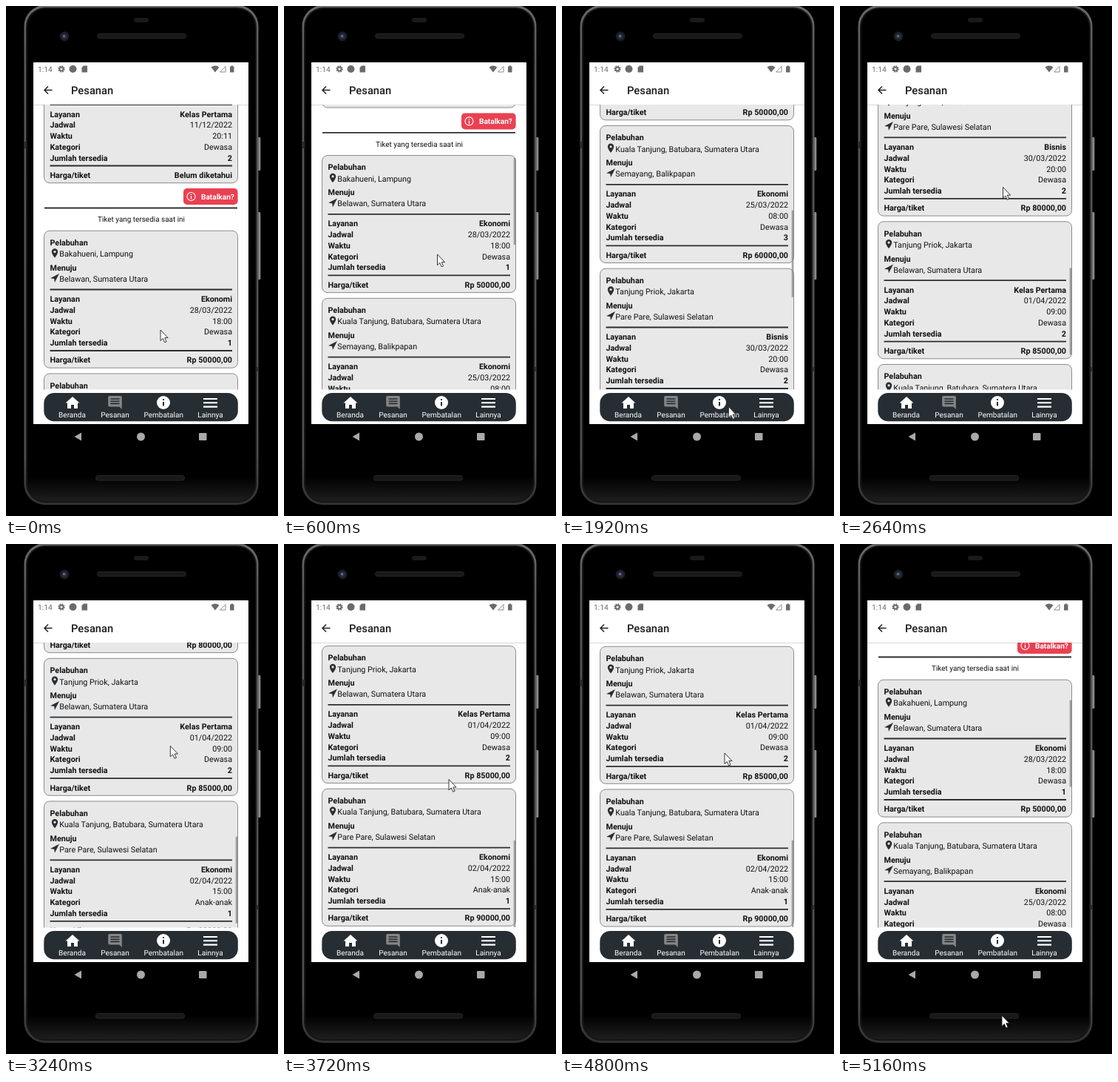
Recreate the animation shown at these times as an HTML page. Size 368 by 688 pixels, loop 5280 ms.

```html
<!DOCTYPE html>
<html lang="id">
<head>
<meta charset="utf-8">
<style>
html, body { margin: 0; width: 100%; height: 100%; overflow: hidden; background: #000; }
svg { display: block; width: 368px; height: 688px; font-family: Roboto, sans-serif; text-rendering: geometricPrecision; }
</style>
</head>
<body>
<svg viewBox="0 0 368 688">
  <defs>
    <clipPath id="view"><rect x="37" y="133" width="291" height="384.5"/></clipPath>
    <linearGradient id="rim" x1="0" x2="0" y1="0" y2="1">
      <stop offset="0" stop-color="#6a6a6a"/><stop offset=".1" stop-color="#585858"/>
      <stop offset=".9" stop-color="#505050"/><stop offset="1" stop-color="#303030"/>
    </linearGradient>
    <linearGradient id="glass" x1="0" x2="0" y1="0" y2="1">
      <stop offset="0" stop-color="#000"/><stop offset=".95" stop-color="#000"/><stop offset="1" stop-color="#1e1e1e"/>
    </linearGradient>
    <linearGradient id="key" x1="0" x2="1" y1="0" y2="0">
      <stop offset="0" stop-color="#444"/><stop offset=".6" stop-color="#9a9a9a"/><stop offset="1" stop-color="#666"/>
    </linearGradient>
    <path id="pin" d="M0-6.2a4.2 4.2 0 0 0-4.2 4.2C-4.2 1 0 6.2 0 6.2S4.2 1 4.2-2A4.2 4.2 0 0 0 0-6.2Z"/>
    <path id="plane" d="M6-6-6 .2-.8.9-.1 6Z"/>
  </defs>

  <!-- phone body -->
  <g fill="url(#key)">
    <rect x="340" y="177" width="4.500" height="45" rx="1.5"/>
    <rect x="340" y="278" width="4.500" height="91" rx="1.5"/>
  </g>
  <rect x="24.500" y="-1" width="317" height="674" rx="28" fill="url(#rim)"/>
  <rect x="27" y="2" width="312" height="668" rx="26" fill="#151515"/>
  <rect x="29" y="4" width="308" height="664" rx="24" fill="url(#glass)"/>
  <path d="M24.500 183h3v9h-3ZM338.500 487h3v6h-3Z" fill="#2c2c2c"/>
  <g fill="#181818" stroke="#262626">
    <rect x="123.500" y="37.500" width="120" height="6" rx="3"/>
    <rect x="121.500" y="633.500" width="120" height="6.500" rx="3"/>
  </g>
  <rect x="173" y="16" width="20" height="6" rx="3" fill="#1a1a1a"/>
  <circle cx="79" cy="41" r="6.500" fill="#1b1d24"/>
  <circle cx="79" cy="41" r="3.500" fill="#2a3046"/>
  <circle cx="78.500" cy="40.500" r="1.500" fill="#6d7590"/>

  <!-- screen -->
  <rect x="37" y="76" width="291" height="488" fill="#fff"/>
  <g fill="#6b6b6b">
    <text x="43" y="89" font-size="10.2">1:14</text>
    <circle cx="75" cy="85" r="2.6" fill="none" stroke="#6b6b6b" stroke-width="2"/>
    <circle cx="75" cy="85" r="4" fill="none" stroke="#6b6b6b" stroke-width="1.4" stroke-dasharray="1.7 1.44"/>
    <circle cx="90.5" cy="85" r="5"/>
    <path d="M105 80.5h5v9h-7.500v-6.500Z"/>
    <path d="M277.500 82.500q5.500-4 11 0L283 89.500Z"/>
    <path d="M297 81.500v7.500h-7.500Z" fill="none" stroke="#8a8a8a"/>
    <path d="M304.500 80.500h2.500v1h1.500v8h-5.500v-8h1.500Z"/>
  </g>
  <path d="M62.500 113.500h-10M57 108.500l-5 5 5 5" fill="none" stroke="#222" stroke-width="1.5"/>
  <text x="88" y="119" font-size="14.75" font-weight="500" fill="#1c1c1e">Pesanan</text>
  <path d="M37 133.500h291" stroke="#d8d8d8"/>

  <g clip-path="url(#view)">
    <g id="list" fill="#111" font-size="10.75"></g>
    <rect id="bar" x="310.700" width="2.800" height="117" fill="#777" fill-opacity=".65"/>
  </g>

  <!-- tab bar -->
  <rect x="51.300" y="522" width="262.500" height="38.300" rx="14" fill="#262d33"/>
  <g fill="#fff">
    <path d="M90 527l9.500 8.500H97v7.500h-5v-5h-4v5h-5v-7.500h-2.500Z"/>
    <path d="M140 526h15q1.800 0 1.800 1.800V544l-3.500-3.500H140q-1.800 0-1.800-1.800V527.800Q138.200 526 140 526Z" fill="#858585"/>
    <path d="M141.500 530h12M141.500 533.200h12M141.500 536.400h12" stroke="#262d33" stroke-width="1.600"/>
    <circle cx="213" cy="535" r="9"/>
    <path d="M213 530v2M213 534v5.500" stroke="#262d33" stroke-width="2"/>
    <path d="M267 530h19M267 535.300h19M267 540.600h19" stroke="#fff" stroke-width="2.100"/>
    <g font-size="10" text-anchor="middle">
      <text x="89.500" y="555">Beranda</text><text x="147.500" y="555">Pesanan</text>
      <text x="213.200" y="555">Pembatalan</text><text x="276.500" y="555">Lainnya</text>
    </g>
  </g>
  <g fill="#a9a9a9">
    <path d="M92.500 581l9.500-5.500v11Z"/>
    <circle cx="182.500" cy="581" r="5.500"/>
    <rect x="261" y="576" width="10.500" height="10" rx="1"/>
  </g>

  <path id="cursor" d="M0 0v14.500l3.400-3 2.300 5.300 2.400-1-2.300-5.200h4.300Z" fill="#fff" stroke="#222" stroke-width=".9"/>
</svg>
<script>
const LOOP = 5280, STEP = 120, PITCH = 192.7;
const byId = id => document.getElementById(id);
const list = byId('list'), bar = byId('bar'), cursor = byId('cursor');

const text = (x, y, str, attrs = '') => `<text x="${x}" y="${y + 3.9}" ${attrs}>${str}</text>`;
const rule = (x1, x2, y) => `<path d="M${x1} ${y}H${x2}" stroke="#2a2f34" stroke-width="1.8"/>`;
const BOLD = 'font-weight="700"', END = 'text-anchor="end"';
const labels = ['Layanan', 'Jadwal', 'Waktu', 'Kategori', 'Jumlah tersedia'];

// y is the middle of the first line of text
function card(y, from, to, values, price) {
  const rows = labels.map((label, i) => {
    const rowY = y + 76.2 + i * 14.75;
    const heavy = i === 0 || i === 4 ? BOLD : '';
    return text(59.5, rowY, label, BOLD) + text(306, rowY, values[i], END + ' ' + heavy);
  }).join('');
  return `<rect x="51.5" y="${y - 15.8}" width="262" height="185" rx="7.5" fill="#e8e8e8" stroke="#8b8b8b"/>`
    + text(59.5, y, 'Pelabuhan', BOLD)
    + `<use href="#pin" x="66" y="${y + 14.5}" fill="#2a2f34"/><circle cx="66" cy="${y + 12.5}" r="1.6" fill="#e8e8e8"/>`
    + text(72.3, y + 15.5, from)
    + text(59.5, y + 34, 'Menuju', BOLD)
    + `<use href="#plane" x="66" y="${y + 48}" fill="#2a2f34"/>`
    + text(72.3, y + 49, to)
    + rule(59.5, 306, y + 63.5) + rows + rule(59.5, 306, y + 146)
    + text(59.5, y + 158.5, 'Harga/tiket', BOLD) + text(306, y + 158.5, price, END + ' ' + BOLD);
}

const ports = {
  bak: 'Bakahueni, Lampung', bel: 'Belawan, Sumatera Utara',
  kua: 'Kuala Tanjung, Batubara, Sumatera Utara', sem: 'Semayang, Balikpapan',
  pri: 'Tanjung Priok, Jakarta', par: 'Pare Pare, Sulawesi Selatan'
};
const tickets = [
  ['bak', 'bel', ['Ekonomi', '28/03/2022', '18:00', 'Dewasa', '1'], 50000],
  ['kua', 'sem', ['Ekonomi', '25/03/2022', '08:00', 'Dewasa', '3'], 60000],
  ['pri', 'par', ['Bisnis', '30/03/2022', '20:00', 'Dewasa', '2'], 80000],
  ['pri', 'bel', ['Kelas Pertama', '01/04/2022', '09:00', 'Dewasa', '2'], 85000],
  ['kua', 'par', ['Ekonomi', '02/04/2022', '15:00', 'Anak-anak', '1'], 90000]
];

list.innerHTML =
  card(69.5, ports.pri, ports.bel, ['Kelas Pertama', '11/12/2022', '20:11', 'Dewasa', '2'], 'Belum diketahui')
  + '<rect x="240" y="246" width="73.600" height="22" rx="5" fill="#ea4152"/>'
  + '<circle cx="250.500" cy="257" r="5.500" fill="none" stroke="#fff" stroke-width="1.100"/>'
  + '<path d="M250.500 253.800v1.300M250.500 256.300v4" stroke="#fff" stroke-width="1.300"/>'
  + text(264, 257, 'Batalkan?', 'font-size="10.1" fill="#fff" ' + BOLD)
  + rule(52, 313, 272.5)
  + text(183, 287.5, 'Tiket yang tersedia saat ini', 'font-size="9.95" text-anchor="middle"')
  + tickets.map(([from, to, values, price], i) =>
      card(319 + i * PITCH, ports[from], ports[to], values, `Rp ${price},00`)).join('');

// each key: time, value(s)
const scroll = [[0, 0], [600, 101.6], [840, 186], [1080, 260], [1440, 322.5], [1800, 334], [2400, 336],
  [2520, 445], [2640, 590.5], [2760, 645], [3000, 705], [3360, 738], [3720, 743.7], [4680, 743.7],
  [4800, 743], [4920, 620], [5040, 365], [5160, 120], [LOOP, 0]];
const pointer = [[0, 209, 437], [600, 207.5, 335], [840, 214, 270], [1440, 222, 264.5], [1800, 226, 543],
  [2400, 223, 531], [2520, 222, 400], [2640, 220.5, 244.5], [3000, 222, 250], [3720, 223, 317.5],
  [4800, 220, 282], [4920, 220, 400], [5040, 221, 545], [5160, 219, 636], [LOOP, 209, 437]];
const barAlpha = [[0, 0], [120, 1], [3960, 1], [4320, 0], [4680, 0], [4800, 1], [LOOP, 1]];

function at(keys, t) {
  const i = keys.findIndex(k => k[0] > t);
  const a = keys[i - 1], b = keys[i];
  const p = (t - a[0]) / (b[0] - a[0]);
  return a.slice(1).map((v, n) => v + (b[n + 1] - v) * p);
}

function draw(now) {
  const t = Math.floor((now % LOOP) / STEP) * STEP;
  const [y] = at(scroll, t), [cx, cy] = at(pointer, t);
  list.setAttribute('transform', `translate(0 ${-y})`);
  bar.setAttribute('y', 174.2 + 0.3035 * y);
  bar.setAttribute('opacity', at(barAlpha, t)[0]);
  cursor.setAttribute('transform', `translate(${cx} ${cy})`);
}

let start;
function tick(now) {
  start ??= now;
  draw(now - start);
  requestAnimationFrame(tick);
}
draw(0);
requestAnimationFrame(tick);
</script>
</body>
</html>
```
